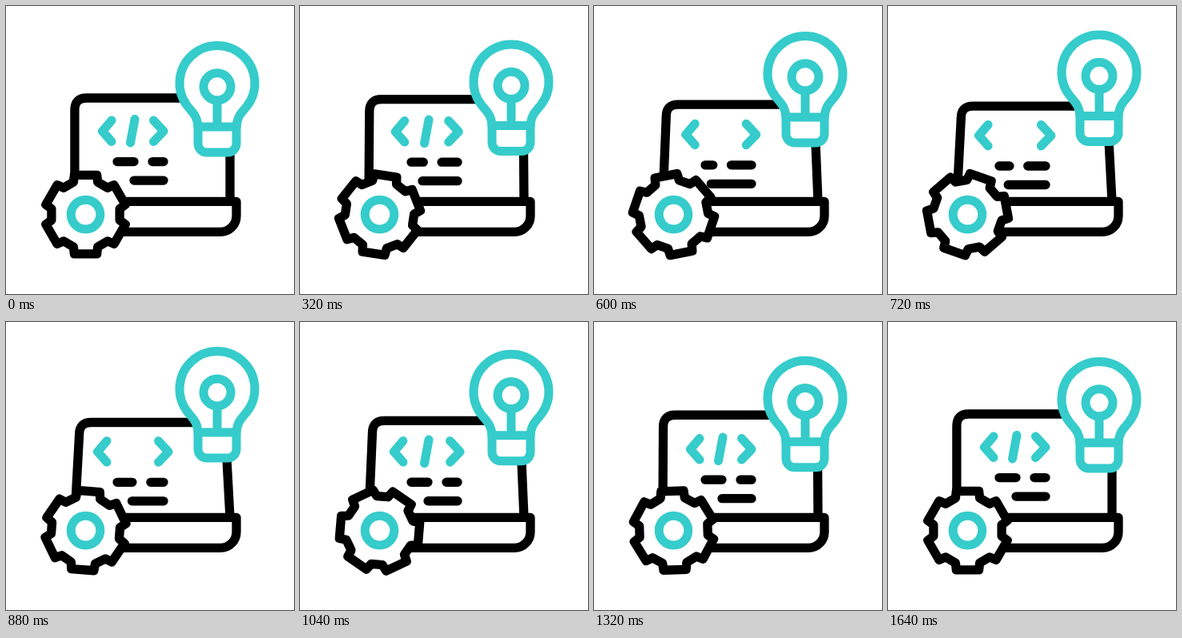
An HTML page for the animation above (1680 ms loop, 360 px wide and 360 px high).

```html
<!DOCTYPE html>
<html>
<head>
<meta charset="utf-8">
<style>
  html, body { margin: 0; height: 100%; overflow: hidden; background: #fff; }
  svg { display: block; width: 100vw; height: 100vh; }
  path, circle { fill: none; stroke: #000; stroke-width: 11.3; stroke-linecap: round; stroke-linejoin: round; }
  .teal path, .teal circle { stroke: #35cccb; stroke-width: 11; }
  path.solid { fill: #fff; }
</style>
</head>
<body>
<svg viewBox="0 0 360 360">
  <path id="screen"/>
  <path d="M100 244.4H288V262.4A20 20 0 0 1 268 282.4H100"/>
  <g id="content">
    <g class="teal">
      <path id="left" d="M132 143L120.5 156.5L132 169.5"/>
      <path id="slash" d="M161 141.5L155.5 171"/>
      <path id="right" d="M184.5 143L197 156.5L184.5 169.5"/>
    </g>
    <path id="lines"/>
  </g>
  <g id="bulb" class="teal">
    <path class="solid" d="M240 153C240 138 233 133 227 125.4A47 47 0 1 1 301 125.4C295 133 288 138 288 153V172A11 11 0 0 1 277 183H251A11 11 0 0 1 240 172Z"/>
    <path d="M240 151H288M264 119V151"/>
    <circle cx="264" cy="100.8" r="17"/>
  </g>
  <g transform="translate(99.5 260.6)">
    <path id="gear" class="solid"/>
    <g class="teal"><circle r="18.3"/></g>
  </g>
</svg>
<script>
const LOOP = 1680, STEP = 40;
const el = id => document.getElementById(id);
const [screen, content, left, slash, right, lines, bulb, gear] =
  ['screen', 'content', 'left', 'slash', 'right', 'lines', 'bulb', 'gear'].map(el);

const ramp = (t, a, b) => Math.min(1, Math.max(0, (t - a) / (b - a)));
const smooth = u => u * u * (3 - 2 * u);
const easeInOut = u => u < 0.5 ? (2 * u) ** 2.5 / 2 : 1 - (2 - 2 * u) ** 2.5 / 2;
// Rises from a to b, rests until c, falls back until d.
const swing = (t, a, b, c, d) => smooth(ramp(t, a, b)) - smooth(ramp(t, c, d));
const move = (node, x, y) => node.setAttribute('transform', `translate(${x} ${y})`);

function gearPath() {
  const points = [];
  for (let tooth = 0; tooth < 6; tooth++) {
    for (const [offset, r] of [[-20.5, 43.2], [-16, 51.2], [16, 51.2], [20.5, 43.2]]) {
      const a = (tooth * 60 - 90 + offset) * Math.PI / 180;
      points.push(`${r * Math.cos(a)} ${r * Math.sin(a)}`);
    }
  }
  return `M${points.join('L')}Z`;
}
gear.setAttribute('d', gearPath());

function draw(t) {
  const tilt = swing(t, 160, 800, 880, 1440);
  const inset = 5.7 * tilt, top = 115 + 10.5 * tilt;
  const l = 85.9 + inset, r = 280 - inset;
  screen.setAttribute('d', `M85.9 244.4L${l} ${top + 15}Q${l} ${top} ${l + 15} ${top}` +
    `H${r - 15}Q${r} ${top} ${r} ${top + 15}L280 244.4`);

  move(content, 0, 5.7 * swing(t, 200, 800, 1000, 1600));
  const spread = 7 * swing(t, 160, 760, 760, 1280);
  move(left, -spread, 0);
  move(right, spread, 0);
  slash.style.display = t >= 600 && t < 920 ? 'none' : '';

  const grow = swing(t, 80, 560, 560, 1000);
  lines.setAttribute('d', `M139 194.6H${160 - 11.5 * grow}M${183 - 11.8 * grow} 194.6H197` +
    `M${160 - 14 * grow} 218.1H197`);

  move(bulb, 0, -13.5 * swing(t, 220, 700, 800, 1440));
  bulb.firstElementChild.style.strokeWidth = 11;
  gear.setAttribute('transform', `rotate(${180 * easeInOut(ramp(t, 40, 1470))})`);
}

const start = performance.now();
function frame() {
  const t = (performance.now() - start) % LOOP;
  draw(Math.floor(t / STEP) * STEP);
  requestAnimationFrame(frame);
}
frame();
</script>
</body>
</html>
```
